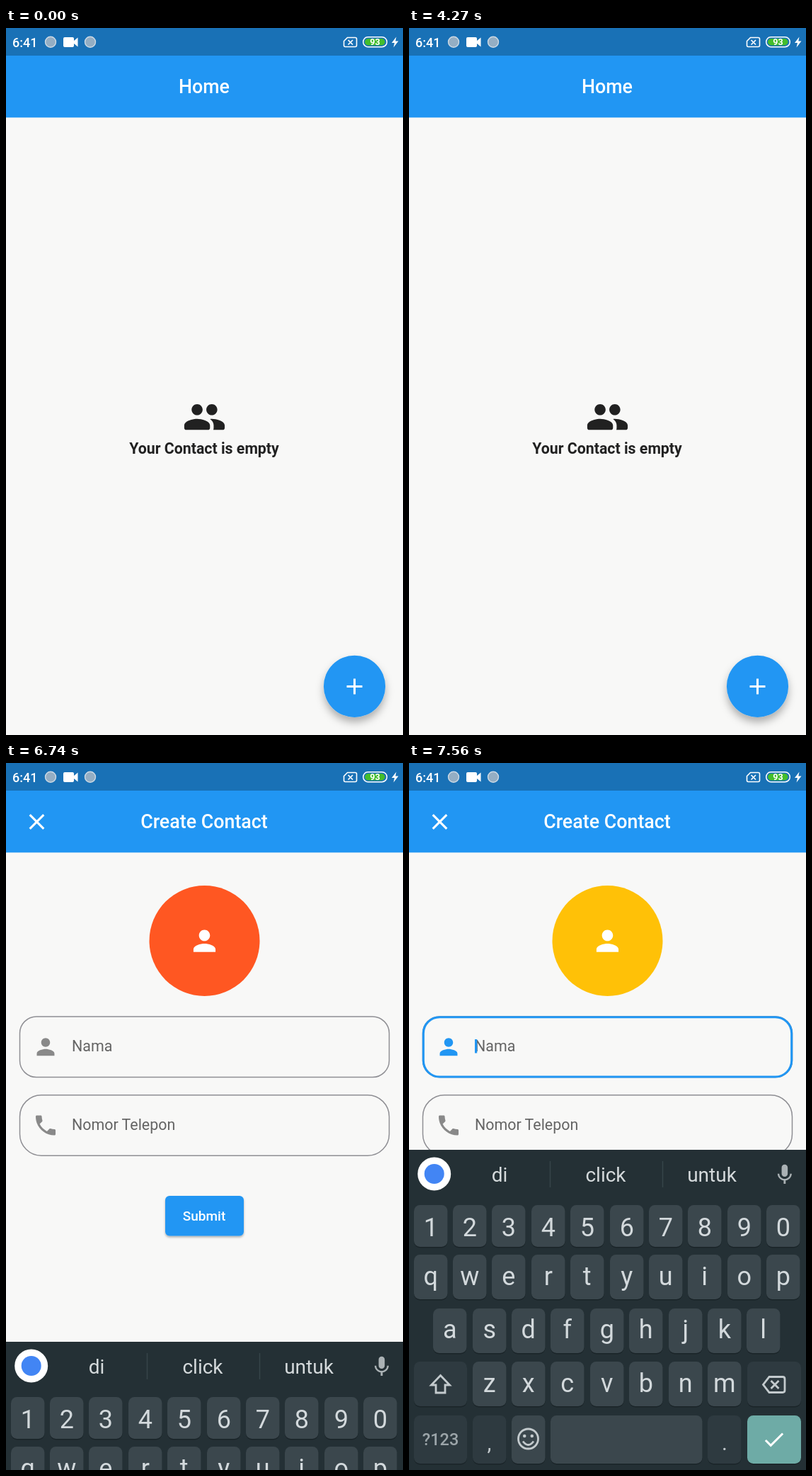
Animation, 561 px wide and 998 px high, one loop 8 s. Source, as an HTML page:

```html
<!DOCTYPE html>
<html lang="id">
<head>
<meta charset="utf-8">
<title>Contacts</title>
<style>
  html, body { margin: 0; width: 100%; height: 100%; overflow: hidden; background: #f8f8f7; }
  svg { display: block; width: 561px; height: 998px; font-family: Roboto, sans-serif; }
  .mid { text-anchor: middle; }
  .title { font-size: 26.8px; font-weight: 500; fill: #fff; }
  .label { font-size: 21.4px; fill: #646464; }
  .word { font-size: 28px; fill: #d5dadc; }
  .cap { font-size: 36px; fill: #d3d9dc; }
  .line { fill: none; stroke: #c3cacd; stroke-width: 2.8; }
  .box { fill: none; stroke: #8f8f94; stroke-width: 1.5; }
</style>
</head>
<body>
<svg viewBox="0 0 561 998">
  <defs>
    <filter id="high" x="-30%" y="-30%" width="160%" height="170%">
      <feDropShadow dx="0" dy="7" stdDeviation="6" flood-opacity=".3"/>
    </filter>
    <filter id="low" x="-20%" y="-20%" width="140%" height="160%">
      <feDropShadow dx="0" dy="2" stdDeviation="1.6" flood-opacity=".3"/>
    </filter>
    <path id="person" d="M12 12c2.21 0 4-1.79 4-4s-1.79-4-4-4-4 1.79-4 4 1.79 4 4 4zm0 2c-2.67 0-8 1.34-8 4v2h16v-2c0-2.66-5.33-4-8-4z"/>
  </defs>

  <rect width="561" height="998" fill="#f8f8f7"/>
  <rect width="561" height="126.400" fill="#2196f3"/>
  <rect width="561" height="39" fill="#1971b6"/>

  <!-- status bar -->
  <g fill="#fff">
    <text x="9" y="26.5" font-size="18" font-weight="500">6:41</text>
    <g fill="#94aec4" stroke="#cddae5" stroke-width="1.400">
      <circle cx="63" cy="19.700" r="7.500"/>
      <circle cx="119" cy="19.700" r="7.500"/>
    </g>
    <path d="M83 13h11q2 0 2 2v3l5.500-4.500v13L96 22v3q0 2-2 2H83q-2 0-2-2V15q0-2 2-2z"/>
    <path d="M482.500 13.500H493.500q2 0 2 2v9q0 2-2 2H479.500q-2 0-2-2V18.500z" fill="none" stroke="#fff" stroke-width="1.600"/>
    <path d="M483.500 17l6.500 6.500m0-6.500l-6.500 6.500" stroke="#fff" stroke-width="1.700"/>
    <rect x="504.700" y="12.700" width="33.600" height="14" rx="7" fill="none" stroke="#fff" stroke-width="1.500"/>
    <rect x="507" y="15" width="28.500" height="9.500" rx="4.750" fill="#43bd2c"/>
    <text class="mid" x="521.500" y="24.200" font-size="12.500" font-weight="700">93</text>
    <path d="M551.500 12.500l-6.500 8.500h4l-1.500 6.500 7-9h-4.200z"/>
  </g>

  <g id="home">
    <text class="mid title" x="280" y="92">Home</text>
    <path transform="translate(249.300 518) scale(2.597)" fill="#212121" d="M16 11c1.660 0 2.990-1.340 2.990-3S17.660 5 16 5s-3 1.340-3 3 1.340 3 3 3zM8 11c1.660 0 2.990-1.340 2.990-3S9.660 5 8 5 5 6.340 5 8s1.340 3 3 3zM8 13c-2.330 0-7 1.170-7 3.500V18c0 .55.45 1 1 1h12c.55 0 1-.45 1-1v-1.500c0-2.330-4.670-3.500-7-3.500zM16 13c-.29 0-.62.02-.97.05 1.160.84 1.970 1.970 1.970 3.450V18c0 .35-.07.69-.18 1H22c.55 0 1-.45 1-1v-1.500c0-2.330-4.670-3.500-7-3.500z"/>
    <text class="mid" x="280" y="601" font-size="21.300" font-weight="700" fill="#212121">Your Contact is empty</text>
    <circle cx="492.500" cy="929.300" r="43.600" fill="#2196f3" filter="url(#high)"/>
    <path d="M481.500 929.500h22m-11-11v22" stroke="#fff" stroke-width="3.100"/>
  </g>

  <g id="form">
    <path transform="translate(24.800 64.300) scale(1.558)" fill="#fff" d="M19 6.410L17.590 5 12 10.590 6.410 5 5 6.410 10.590 12 5 17.590 6.410 19 12 13.410 17.590 19 19 17.590 13.410 12z"/>
    <text class="mid title" x="280" y="92">Create Contact</text>
    <circle id="avatar" cx="280.500" cy="251" r="78"/>
    <use href="#person" transform="translate(257.100 227.800) scale(1.948)" fill="#fff"/>

    <rect id="plain" class="box" x="19.500" y="358" width="522" height="85.500" rx="30.500"/>
    <rect id="focus" x="20.300" y="358.700" width="520.400" height="84.300" rx="23" fill="none" stroke="#2196f3" stroke-width="3.100"/>
    <use id="icon" href="#person" transform="translate(37.300 382) scale(1.558)"/>
    <text class="label" x="93" y="407">Nama</text>
    <rect id="cursor" x="93" y="390" width="3.200" height="19.500" fill="#2196f3"/>

    <rect class="box" x="19.500" y="468.700" width="522" height="85.500" rx="30.500"/>
    <path transform="translate(37.300 492.800) scale(1.558)" fill="#898989" d="M6.620 10.790c1.440 2.830 3.760 5.140 6.590 6.590l2.200-2.200c.27-.27.67-.36 1.020-.24 1.120.37 2.330.57 3.570.57.55 0 1 .45 1 1V20c0 .55-.45 1-1 1-9.390 0-17-7.610-17-17 0-.55.45-1 1-1h3.500c.55 0 1 .45 1 1 0 1.250.2 2.450.57 3.570.11.35.03.74-.25 1.020z"/>
    <text class="label" x="93" y="518">Nomor Telepon</text>

    <rect x="225" y="611" width="111" height="56.500" rx="6" fill="#2196f3" filter="url(#low)"/>
    <text class="mid" x="280" y="645.800" font-size="19" font-weight="500" fill="#fff">Submit</text>
  </g>

  <g id="board">
    <rect width="561" height="452" fill="#243035"/>
    <circle cx="35.700" cy="34" r="23.500" fill="#fff"/>
    <circle cx="35.700" cy="34" r="14" fill="#4285f4"/>
    <text class="mid word" x="128" y="45">di</text>
    <text class="mid word" x="278" y="45">click</text>
    <text class="mid word" x="428" y="45">untuk</text>
    <path d="M199.500 16v37M358.500 16v37" stroke="#37444a" stroke-width="1.500"/>
    <path transform="translate(513.700 18) scale(1.430)" fill="#aab1b4" d="M12 14c1.660 0 2.990-1.340 2.990-3L15 5c0-1.660-1.340-3-3-3S9 3.340 9 5v6c0 1.660 1.340 3 3 3zm5.300-3c0 3-2.540 5.100-5.300 5.100S6.700 14 6.700 11H5c0 3.410 2.720 6.230 6 6.720V21h2v-3.280c3.280-.48 6-3.300 6-6.720z"/>
    <g id="keys"></g>
    <path class="line" d="M44.500 318.500L57.500 332H51v11H38v-11h-6.500z"/>
    <path class="line" d="M509 320.500h19q3 0 3 3v16q0 3-3 3h-19l-8.500-11zM511.500 326l11 11m0-11l-11 11"/>
    <text class="mid" x="44.500" y="417" font-size="23.500" font-weight="500" fill="#9ca5a9">?123</text>
    <text class="mid" x="113.500" y="424" font-size="30" fill="#c3cacd">,</text>
    <text class="mid" x="446" y="424" font-size="30" fill="#c3cacd">.</text>
    <circle class="line" cx="168.500" cy="408" r="14"/>
    <path class="line" d="M161 411.500q7.500 10 15 0"/>
    <circle cx="163.200" cy="404" r="2.300" fill="#c3cacd"/>
    <circle cx="173.800" cy="404" r="2.300" fill="#c3cacd"/>
    <path transform="translate(497.700 391) scale(1.500)" fill="#fff" d="M9 16.170L4.830 12l-1.420 1.410L9 19 21 7l-1.410-1.410z"/>
  </g>
</svg>

<script>
const LOOP = 8000, OPEN = 5100, RISE = 6740, FOCUS = 6860;
const PITCH = 55.4, KEY = 47.5, BOARD = 452;
const $ = id => document.getElementById(id);
const clamp = v => Math.max(0, Math.min(1, v));

function add(tag, attrs, text) {
  const el = document.createElementNS('http://www.w3.org/2000/svg', tag);
  for (const k in attrs) el.setAttribute(k, attrs[k]);
  if (text) el.textContent = text;
  $('keys').appendChild(el);
}

function key(x, y, width, height, fill = '#3b474d') {
  add('rect', { x, y: y + 1.5, width, height, rx: 8.5, fill: '#1a2428' });
  add('rect', { x, y, width, height, rx: 8.5, fill });
}

function row(letters, x, y, height, base) {
  [...letters].forEach((c, i) => {
    const left = Math.floor(x + i * PITCH);
    key(left, y, KEY, height);
    add('text', { class: 'mid cap', x: left + KEY / 2, y: base }, c);
  });
}

const DARK = '#2e3a40';
row('1234567890', 7, 78, 59, 122);
row('qwertyuiop', 7, 148, 63, 191);
row('asdfghjkl', 34.7, 224, 63, 266);
row('zxcvbnm', 90, 299, 63, 342);
key(7, 299, 75, 63, DARK);
key(478, 299, 76, 63, DARK);
key(7, 375, 75, 68, DARK);
key(90, 375, KEY, 68, DARK);
key(145, 375, KEY, 68);
key(200, 375, 214.5, 68);
key(422, 375, KEY, 68, DARK);
key(478, 375, 76, 68, '#6eaba6');
$('plain').setAttribute('rx', 23.5);

const show = (id, on) => $(id).setAttribute('display', on ? 'inline' : 'none');

function draw(t) {
  show('home', t < OPEN);
  show('form', t >= OPEN);

  // the keyboard decelerates upwards in 40 ms steps
  const step = Math.floor((t - RISE) / 40) * 40;
  const left = (1 - clamp((step + 40.8) / 181)) ** 2;
  const top = Math.round(998 - BOARD * (1 - left));
  show('board', t >= RISE);
  $('board').setAttribute('transform', `translate(0 ${top})`);

  const focused = t >= FOCUS;
  $('focus').setAttribute('opacity', clamp((t - FOCUS) / 160));
  $('icon').setAttribute('fill', focused ? '#2196f3' : '#898989');
  $('avatar').setAttribute('fill', focused ? '#ffc107' : '#ff5722');
  show('cursor', focused && (t < 7060 || t >= 7560));
}

const start = performance.now();
function tick() {
  draw((performance.now() - start) % LOOP);
  requestAnimationFrame(tick);
}
tick();
</script>
</body>
</html>
```
